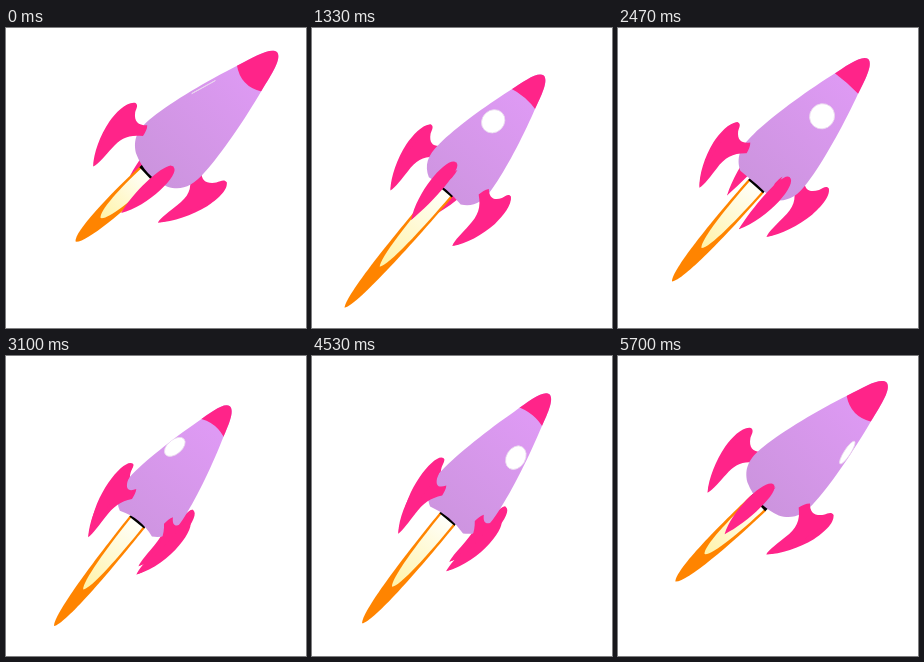
An HTML page with a canvas that plays this animation: 300 by 300 pixels, repeating every 5730 ms.

```html
<!DOCTYPE html>
<html lang="en">
<head>
<meta charset="utf-8">
<title>Spinning rocket</title>
<style>
  html, body { margin: 0; width: 100%; height: 100%; overflow: hidden; background: #fff; }
  canvas { display: block; width: 300px; height: 300px; }
</style>
</head>
<body>
<canvas id="stage" width="300" height="300"></canvas>
<script>
const ctx = document.getElementById('stage').getContext('2d');
const LOOP = 5730;
const TURN = 48; // steps per full spin, 25 steps a second
const PINK = '#ff2489';
const rad = deg => deg * Math.PI / 180;
const wave = (step, peak) => Math.cos(2 * Math.PI * (step - peak) / TURN);

// Steps run at 25 per second but are shown on a 30 Hz clock.
function stepAt(ms) {
  const slot = Math.floor((ms % LOOP + 4) * 30 / 1000);
  return Math.min(142, Math.floor(slot * 5 / 6));
}

function poseAt(step) {
  const tail = 172 * (0.945 + 0.07 * wave(step, 5));
  const bulge = 6 * wave(step, 0);
  const beat = Math.min(step % 6, 6 - step % 6) / 3;
  return {
    x: 247 + 25 * wave(step, 2),
    y: 36.3 - 14 * wave(step, 4),
    tilt: rad(47.8 - 4.6 * wave(step, -0.3)),
    tail,
    long: tail / 172,
    wide: 0.945 + 0.055 * wave(step, 2),
    bulge,
    rim: 33.5 + 4.8 * wave(step, 0),
    port: 72 + 6 * wave(step, 3),
    lean: 0.24 + 0.14 * wave(step, 0),
    spin: 7.5 * step - 82.5,
    base: tail + bulge * 0.8 + 1.5,
    flame: (150 + 22 * wave(step, 22.5)) * (0.765 + 0.235 * beat ** 1.5)
  };
}

// Local axes: x runs from nose to tail, y across the rocket.
function bodyPath(p) {
  const path = new Path2D();
  const at = (u, v) => [u * p.long, v * p.wide];
  const curve = (...pts) => path.bezierCurveTo(...pts.flatMap(q => at(...q)));
  path.moveTo(0, 0);
  curve([1, 8], [18, 12], [38, 17.5]);
  curve([70, 27], [110, 36], [135, 38]);
  curve([155, 40], [165, 35], [172, 23]);
  path.quadraticCurveTo(p.tail + 1.6 * p.bulge, 0, ...at(172, -23));
  curve([165, -35], [155, -40], [135, -38]);
  curve([110, -36], [70, -27], [38, -17.5]);
  curve([18, -12], [1, -8], [0, 0]);
  path.closePath();
  return path;
}

function drawFin(p, deg) {
  const sin = Math.sin(rad(deg)), cos = Math.cos(rad(deg));
  const shift = p.lean * Math.cos(rad(deg + 8));
  // u is measured from the tail; the fin narrows towards the nose
  const at = ([u, r, w = 0]) => {
    const size = p.wide + (1 - p.wide) * (u + 40) / 76;
    return [p.tail + u + shift * r, r * size * sin + w * cos + 5 * cos ** 3];
  };
  const shape = (start, ...curves) => {
    ctx.beginPath();
    ctx.moveTo(...at(start));
    curves.forEach(c => ctx.bezierCurveTo(...c.flatMap(at)));
    ctx.fill();
  };
  ctx.fillStyle = PINK;
  // flat side
  shape([-40, 61],
    [[-35, 68], [-20, 67], [-9, 65]],
    [[8, 61], [25, 53], [36, 43]],
    [[31, 41], [18, 43], [10, 43.5]],
    [[-4, 45], [-12, 42], [-20, 31]],
    [[-24, 32], [-28, 33], [-31, 36]],
    [[-25, 42], [-25, 48], [-33, 54]],
    [[-37, 56], [-41, 57], [-40, 61]]);
  // edge
  shape([-40, 60],
    [[-42, 64, 10], [4, 65, 10.5], [36, 43]],
    [[4, 65, -10.5], [-42, 64, -10], [-40, 60]]);
}

function drawTongue(start, length, half, fill) {
  const end = start + length;
  ctx.beginPath();
  ctx.moveTo(start, -half);
  ctx.bezierCurveTo(start + length * 0.45, -half, end - length * 0.06, -half * 0.75, end, 0);
  ctx.bezierCurveTo(end - length * 0.06, half * 0.75, start + length * 0.45, half, start, half);
  ctx.fillStyle = fill;
  ctx.fill();
}

function drawFlame(p) {
  const start = p.base;
  drawTongue(start, p.flame, 10.8 * p.wide, '#ff8400');
  const glow = ctx.createLinearGradient(start, 0, start + p.flame * 0.65, 0);
  glow.addColorStop(0, '#fffffa');
  glow.addColorStop(1, '#fff3a8');
  drawTongue(start, p.flame * 0.65, 8.4 * p.wide, glow);
  ctx.fillStyle = '#000';
  ctx.fillRect(start - 4, -10.5 * p.wide, 4.8, 21 * p.wide);
}

function drawWindow(p, deg) {
  const sin = Math.sin(rad(deg)), cos = Math.cos(rad(deg));
  if (cos <= 0) return;
  ctx.beginPath();
  ctx.ellipse(p.port, 25 * sin * p.wide, 13.5 * p.wide, 13 * cos * p.wide,
    0.25 * sin, 0, 2 * Math.PI);
  ctx.fillStyle = '#fff';
  ctx.fill();
  ctx.strokeStyle = '#ead9ee';
  ctx.lineWidth = 0.8;
  ctx.stroke();
}

function drawBody(p) {
  const path = bodyPath(p);
  const shade = ctx.createLinearGradient(30, 0, 175, 0);
  shade.addColorStop(0, '#de9af4');
  shade.addColorStop(1, '#cc94de');
  ctx.fillStyle = shade;
  ctx.fill(path);
  ctx.save();
  ctx.clip(path);
  drawWindow(p, p.spin - 7);
  drawWindow(p, p.spin + 173);
  ctx.beginPath();
  ctx.moveTo(-5, -22);
  ctx.lineTo(p.rim, -18);
  ctx.quadraticCurveTo(p.rim + 2 * p.bulge, 0, p.rim, 18);
  ctx.lineTo(-5, 22);
  ctx.fillStyle = PINK;
  ctx.fill();
  ctx.restore();
}

function draw(step) {
  const p = poseAt(step);
  const cos = Math.cos(p.tilt), sin = Math.sin(p.tilt);
  ctx.setTransform(1, 0, 0, 1, 0, 0);
  ctx.fillStyle = '#fff';
  ctx.fillRect(0, 0, 300, 300);
  ctx.setTransform(-cos, sin, sin, cos, p.x, p.y);

  const fins = [0, 90, 180, 270].map(a => p.spin + a);
  const isNear = a => Math.cos(rad(a)) > 0;
  fins.filter(a => !isNear(a)).forEach(a => drawFin(p, a));
  drawFlame(p);
  drawBody(p);
  fins.filter(isNear).forEach(a => drawFin(p, a));
}

const begin = performance.now();
function tick() {
  draw(stepAt(performance.now() - begin));
  requestAnimationFrame(tick);
}
tick();
</script>
</body>
</html>
```
